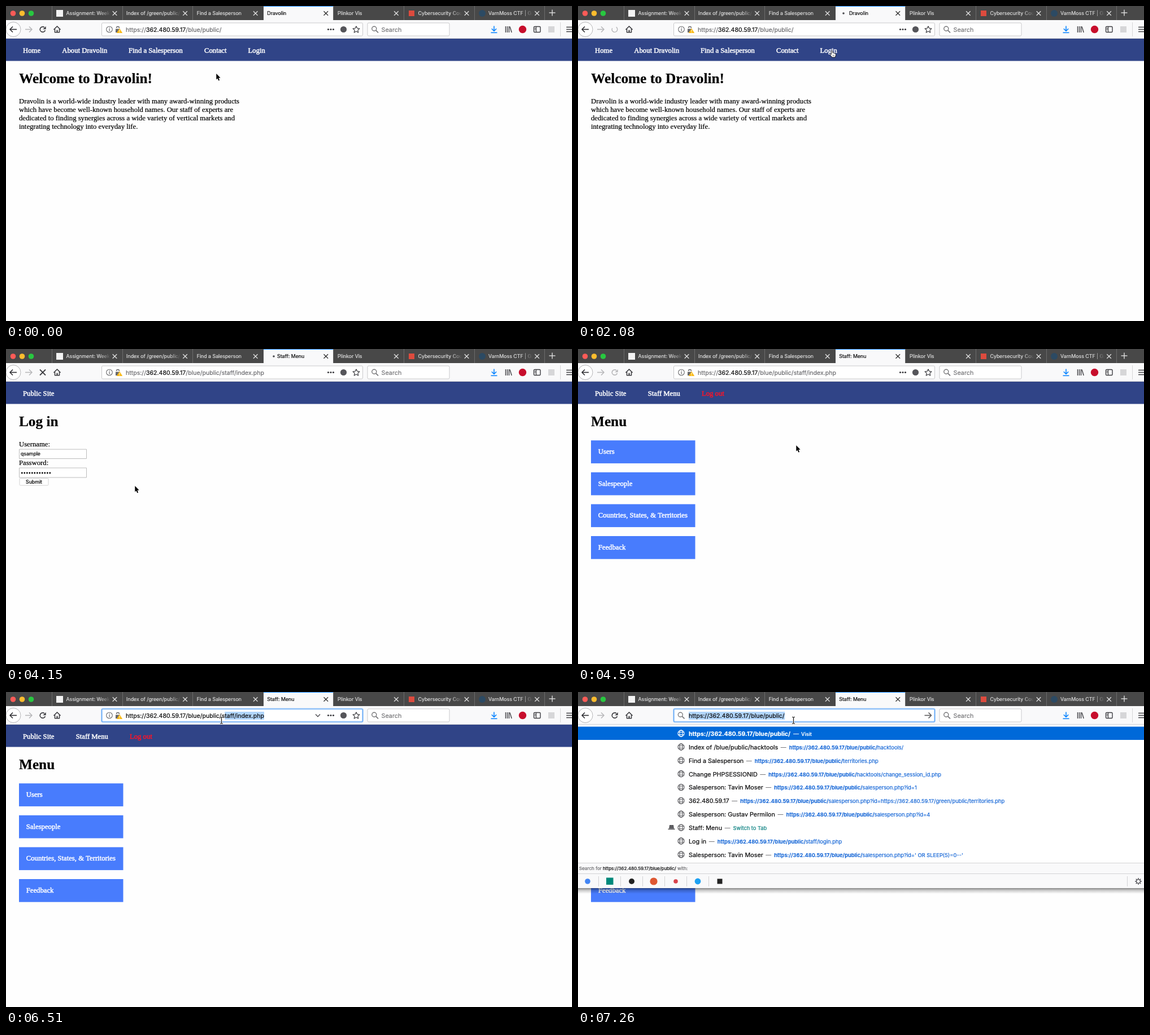
Write an HTML page with a canvas that moves like this. It is 1002x559 px and loops after 8 s.

```html
<!DOCTYPE html>
<html lang="en">
<head>
<meta charset="utf-8">
<title>Browser session</title>
<style>
html, body { margin: 0; width: 100%; height: 100%; overflow: hidden; background: #fefefe; }
canvas { display: block; }
</style>
</head>
<body>
<canvas id="stage" width="1002" height="559"></canvas>
<script>
const c = document.getElementById('stage').getContext('2d');
const LOOP = 8000, TICK = 148.15;
const HOST = '362.480.59.17', BASE = '/blue/public/';
const ROOT = 'https://' + HOST + BASE;
const INK = '#3e3e42', LINK = '#1365d6', SELECT = '#b1d5fb';

const ui = (size, weight = 400) => `${weight} ${size}px Inter, sans-serif`;
const serif = (size, weight = 400) => `${weight} ${size}px "Liberation Serif", serif`;

// Pointer keys: tick, x, y
const PATH = [
  [0, 372, 120], [6, 433, 86], [9, 433, 86], [11, 450, 79], [15, 450, 79],
  [17, 380, 102], [19, 130, 112], [20, 58, 104], [21, 52, 160], [23, 48, 228],
  [25, 49, 232], [26, 90, 236], [28, 228, 243], [29, 230, 243], [31, 386, 171],
  [33, 448, 82], [35, 469, 47], [36, 470, 46], [38, 470, 46], [42, 381.5, 49],
  [43, 381.5, 49], [44, 381.5, 50]
];

function pointerAt(n) {
  const i = PATH.findIndex(k => k[0] >= n);
  if (i < 0) return PATH[PATH.length - 1].slice(1);
  if (i === 0) return PATH[0].slice(1);
  const a = PATH[i - 1], b = PATH[i], p = (n - a[0]) / (b[0] - a[0]);
  return [a[1] + (b[1] - a[1]) * p, a[2] + (b[2] - a[2]) * p];
}

function rect(x, y, w, h, color) {
  c.fillStyle = color;
  c.fillRect(x, y, w, h);
}

function box(x, y, w, h, r, fill, stroke, width = 1) {
  c.beginPath();
  c.roundRect(x, y, w, h, r);
  if (fill) { c.fillStyle = fill; c.fill(); }
  if (stroke) { c.strokeStyle = stroke; c.lineWidth = width; c.stroke(); }
}

function disc(x, y, r, color) {
  c.beginPath();
  c.arc(x, y, r, 0, 7);
  c.fillStyle = color;
  c.fill();
}

function ring(x, y, r, color, width = 1.2, from = 0, to = Math.PI * 2) {
  c.beginPath();
  c.arc(x, y, r, from, to);
  c.strokeStyle = color;
  c.lineWidth = width;
  c.stroke();
}

function trace(points) {
  c.beginPath();
  for (let i = 0; i < points.length; i += 2) c.lineTo(points[i], points[i + 1]);
}

function line(points, color, width = 1.4) {
  trace(points);
  c.strokeStyle = color;
  c.lineWidth = width;
  c.stroke();
}

function poly(points, color) {
  trace(points);
  c.closePath();
  c.fillStyle = color;
  c.fill();
}

// Draws a string, slightly emboldened, and returns the x where it ends
function text(str, x, y, font, color, bolder = 0.22) {
  c.font = font;
  c.fillStyle = c.strokeStyle = color;
  c.lineWidth = bolder;
  c.lineJoin = 'round';
  c.fillText(str, x, y);
  c.strokeText(str, x, y);
  return x + c.measureText(str).width;
}

function cross(x, y, r, color, width = 1.4) {
  line([x - r, y - r, x + r, y + r], color, width);
  line([x - r, y + r, x + r, y - r], color, width);
}

function magnifier(x, y, color) {
  ring(x - 1.2, y - 1.3, 4, color, 1.4);
  line([x + 1.7, y + 1.6, x + 6, y + 5.8], color, 1.7);
}

function globe(x, y, color) {
  ring(x, y, 5.6, color, 1.1);
  c.beginPath();
  c.ellipse(x, y, 2.6, 5.6, 0, 0, 7);
  c.stroke();
  line([x - 5.5, y - 2, x + 5.5, y - 2], color, 0.9);
  line([x - 5.5, y + 2, x + 5.5, y + 2], color, 0.9);
}

function arrow(x, y, dir, color) {
  line([x - 6 * dir, y, x + 5.5 * dir, y], color, 1.6);
  line([x + dir, y - 5, x + 6 * dir, y, x + dir, y + 5], color, 1.6);
}

function tabs(title, loading, n) {
  rect(0, 0, 1002, 25, '#484848');
  ['#fc5b57', '#fdbc2e', '#28c840'].forEach((col, i) => disc(12.5 + i * 16, 13, 4.8, col));
  const names = ['Assignment: Week 10', 'Index of /green/public/', 'Find a Salesperson', title,
    'Plinkor Vis', 'Cybersecurity Course', 'VarnMoss CTF | Gam'];
  names.forEach((name, i) => {
    const x = 81.5 + i * 124.6, on = i === 3;
    if (on) {
      rect(456, 0, 123, 25, '#f9f9fa');
      rect(456, 0, 123, 1, '#0a84ff');
    } else {
      rect(Math.floor(x), 0, 1, 25, '#6c6c6c');
    }
    const iconic = i === 0 || i > 4;
    let left = x + (iconic ? 25 : 7);
    if (on && loading) {
      left = 480;
      disc(472 + 6 * Math.sin((n - 21) * 0.946), 13, 1.8, '#4a4a4f');
    }
    let color = '#0c0c0d';
    if (!on) {
      color = c.createLinearGradient(x + 82, 0, x + 103, 0);
      color.addColorStop(0, '#dcdcdc');
      color.addColorStop(1, 'rgba(220,220,220,0)');
    }
    text(name, left, 16, ui(8.8), color);
    cross(x + 111, 13, 3.8, on ? '#333' : '#dedede', 1.3);
  });
  rect(579, 0, 1, 25, '#6c6c6c');
  rect(953, 0, 1, 25, '#6c6c6c');
  rect(89, 7, 12, 12, '#f2f2f2');
  rect(713, 8, 10, 10, '#dd4b3e');
  disc(843, 13, 6, '#2c4a63');
  line([961.5, 12, 972.5, 12], '#dedede');
  line([967, 6.5, 967, 17.5], '#dedede');
}

function reload(state) {
  if (state === 'stop') return cross(65, 41.5, 5, INK, 1.8);
  if (state === 'arc') return ring(65, 41.5, 4.8, '#b5b5b8', 1.4, -1, 3.6);
  const color = state === 'dim' ? '#b8b8ba' : INK;
  ring(65, 41.5, 4.7, color, 1.7, 0.35, 5.4);
  poly([70.7, 36, 70.7, 41.3, 65.4, 41.3], color);
}

function star(x, y, r) {
  const pts = [];
  for (let i = 0; i <= 10; i++) {
    const a = i * Math.PI / 5 - Math.PI / 2, d = i % 2 ? r * 0.48 : r;
    pts.push(x + d * Math.cos(a), y + d * Math.sin(a));
  }
  line(pts, INK, 1.2);
}

function siteIdentity() {
  ring(183, 41.5, 5.3, '#6a6a6d', 1.1);
  rect(182.4, 40.5, 1.3, 4, '#6a6a6d');
  rect(182.4, 38.2, 1.3, 1.3, '#6a6a6d');
  ring(198, 39, 2.5, '#6a6a6d', 1.4, Math.PI, 6.3);
  rect(194, 40.5, 8, 6.5, '#6a6a6d');
  poly([201, 39.5, 206.2, 48, 195.8, 48], '#f9b915');
  rect(200.5, 42.2, 1, 3, '#fff');
  rect(200.5, 46, 1, 1, '#fff');
}

function addressBar(n, path, mouseX) {
  const focus = n >= 38, editing = n >= 47, hover = n >= 34;
  if (focus) {
    box(169.5, 30, 462, 23, 2.5, '#fff', 'rgba(90,165,250,.4)', 3);
    box(169.5, 30, 462, 23, 2, null, '#68aaf5', 1.2);
  } else {
    box(169.5, 30, 462, 23, 2, '#fff', hover ? '#a4a4a6' : '#c9c9cb');
  }
  const font = ui(10.6);
  c.font = font;
  const measure = s => c.measureText(s).width;
  if (editing) {
    magnifier(182.5, 41.5, '#7a7a7c');
    if (n >= 49) rect(196, 35, measure(ROOT) + 0.5, 14, SELECT);
    text(ROOT, 196, 46, font, '#0c0c0d');
    arrow(619.5, 41.5, 1, '#5a5a5d');
    return;
  }
  siteIdentity();
  if (focus) {
    const full = ROOT + path, end = 212 + measure(full);
    let from = full.length;
    while (from > ROOT.length && 212 + measure(full.slice(0, from)) > mouseX + 6) from--;
    const start = 212 + measure(full.slice(0, from));
    rect(start, 35, end - start, 14, SELECT);
    text(full, 212, 46, font, '#0c0c0d');
  } else {
    let x = text('https://', 212, 46, font, '#6c6c70');
    x = text(HOST, x, 46, font, '#0c0c0d');
    text(BASE + path, x, 46, font, '#6c6c70');
  }
  if (hover) line([548, 39.5, 552, 43.8, 556, 39.5], '#55555a', 1.5);
  [570.5, 575, 579.5].forEach(x => disc(x, 41.5, 1.6, INK));
  disc(597.5, 41.5, 5.6, '#55555a');
  star(620, 42, 6.3);
}

function toolbar(n, path, state, mouseX) {
  rect(0, 25, 1002, 33, '#f9f9fa');
  rect(0, 57, 1002, 1, '#d0d0d2');
  disc(13, 41.5, 13, '#fff');
  ring(13, 41.5, 13, '#b4b4b6', 1);
  arrow(13, 41.5, -1, '#2c2c30');
  arrow(40, 41.5, 1, '#b8b8ba');
  reload(state);
  line([84.5, 42, 90.5, 36, 96.5, 42], INK, 1.7);
  line([86.5, 41, 86.5, 46.8, 94.5, 46.8, 94.5, 41], INK, 1.6);
  rect(89.4, 42.6, 2.2, 4, INK);

  addressBar(n, path, mouseX);

  box(640, 30, 145, 23, 2, '#fff', '#c9c9cb');
  magnifier(653, 41.5, '#737376');
  text('Search', 664.5, 46, ui(10.8), '#77777a');

  line([864, 35.5, 864, 44], '#0a84ff', 1.6);
  line([859.8, 40.2, 864, 44.4, 868.2, 40.2], '#0a84ff', 1.6);
  line([858.5, 47.3, 869.5, 47.3], '#0a84ff', 1.6);
  [884.5, 887.5, 890.5].forEach(x => line([x, 36, x, 47], INK, 1.4));
  line([892, 36.5, 895.2, 47], INK, 1.4);
  disc(914.5, 41.5, 6.7, '#c70d2c');
  box(934.5, 36.5, 11.5, 10, 1.5, null, INK, 1.4);
  line([938.5, 36.5, 938.5, 46.5], INK, 1.2);
  line([935.5, 39.5, 938, 39.5], INK, 1);
  line([935.5, 42, 938, 42], INK, 1);
  rect(960, 36, 11, 11, '#d6d6d8');
  rect(981, 29, 1, 25, '#d5d5d7');
  [37.5, 41.5, 45.5].forEach(y => line([992, y, 1002, y], INK, 1.5));
}

const heavy = (str, x, y, color) => text(str, x, y, serif(12.7), color, 0.5);
const heading = str => text(str, 23, 137, serif(25.3, 700), '#000');
const copy = (str, y) => text(str, 23, y, serif(12.7), '#000');

function nav(items) {
  rect(0, 58, 1002, 39.5, '#304487');
  items.forEach(([label, x]) => heavy(label, x, 83, label === 'Log out' ? '#fb1428' : '#fff'));
}

const pages = {
  home() {
    nav([['Home', 30], ['About Dravolin', 99.3], ['Find a Salesperson', 217],
      ['Contact', 351], ['Login', 428.6]]);
    heading('Welcome to Dravolin!');
    ['Dravolin is a world-wide industry leader with many award-winning products',
      'which have become well-known household names. Our staff of experts are',
      'dedicated to finding synergies across a wide variety of vertical markets and',
      'integrating technology into everyday life.'
    ].forEach((str, i) => copy(str, 173 + i * 15));
  },
  login() {
    nav([['Public Site', 30]]);
    heading('Log in');
    copy('Username:', 173);
    box(23.5, 178, 119, 16.5, 0, '#fff', '#bcbcbc');
    text('qsample', 26, 189, ui(8.7), '#000');
    copy('Password:', 206);
    box(23.5, 211, 119, 17, 0, '#fff', '#bcbcbc');
    for (let i = 0; i < 12; i++) disc(28.3 + i * 4.5, 220, 1.4, '#000');
    box(24, 229.5, 51, 12.5, 1.5, '#fff', '#d2d2d2');
    text('Submit', 35, 239, ui(8.8), '#000');
  },
  menu() {
    nav([['Public Site', 30], ['Staff Menu', 123.7], ['Log out', 219]]);
    heading('Menu');
    ['Users', 'Salespeople', 'Countries, States, & Territories', 'Feedback'].forEach((label, i) => {
      const y = 162.2 + i * 56.6;
      rect(23, y, 184.5, 40.7, '#487cfd');
      heavy(label, 35.8, Math.round(y + 23.8), '#fff');
    });
  }
};

const RESULTS = [
  ['Index of ' + BASE + 'hacktools', 'hacktools/'],
  ['Find a Salesperson', 'territories.php'],
  ['Change PHPSESSIONID', 'hacktools/change_session_id.php'],
  ['Salesperson: Tavin Moser', 'salesperson.php?id=1'],
  [HOST, `salesperson.php?id=https://${HOST}/green/public/territories.php`],
  ['Salesperson: Gustav Permilon', 'salesperson.php?id=4'],
  ['Staff: Menu', null],
  ['Log in', 'staff/login.php'],
  ['Salesperson: Tavin Moser', "salesperson.php?id=' OR SLEEP(5)=0--'"]
];

function suggestions() {
  const shade = c.createLinearGradient(0, 348, 0, 358);
  shade.addColorStop(0, 'rgba(0,0,0,.48)');
  shade.addColorStop(0.4, 'rgba(0,0,0,.2)');
  shade.addColorStop(1, 'rgba(0,0,0,0)');
  rect(0, 348, 1002, 10, shade);
  rect(0, 58, 1002, 245, '#fff');
  rect(0, 61.5, 1002, 23.5, '#0069d9');
  globe(182.5, 73.5, '#fff');
  let x = text(ROOT, 196, 78, ui(10.6, 700), '#fff');
  line([x + 5, 74.5, x + 15, 74.5], '#fff', 1);
  text('Visit', x + 19, 78, ui(9, 500), '#fff');

  RESULTS.forEach(([title, tail], i) => {
    const y = 97.8 + i * 23.85, base = Math.round(y + 4);
    globe(182.5, y - 0.3, '#5c5c60');
    const end = text(title, 196, base, ui(10.8), '#0c0c0d');
    line([end + 4.5, base - 3.5, end + 14.5, base - 3.5], '#77777a', 1);
    if (tail === null) {
      text('Switch to Tab', end + 19.5, base, ui(9.3), '#0b8080');
      poly([162, 236, 169, 236, 170, 242.5, 161, 242.5], '#5c5c60');
      rect(159.5, 242.5, 12, 1.7, '#5c5c60');
    } else {
      const bold = text(ROOT, end + 19.5, base, ui(9.4, 600), LINK);
      text(tail, bold, base, ui(9.4), LINK);
    }
  });

  rect(0, 303, 1002, 45, '#f9f9fa');
  rect(0, 303, 1002, 1, '#d2d2d4');
  rect(0, 322, 1002, 1, '#d2d2d4');
  x = text('Search for ', 2, 316, ui(8.1), '#6a6a6d');
  x = text(ROOT, x, 316, ui(8.1), '#0c0c0d');
  text(' with:', x, 316, ui(8.1), '#6a6a6d');

  disc(17, 336, 4.8, '#4285f4');
  rect(50, 329.5, 12.5, 12.5, '#00897b');
  disc(95, 336, 5, '#222');
  disc(134, 336, 6.6, '#de5833');
  disc(173, 336, 3.8, '#d8434c');
  disc(212, 336, 5.4, '#1da1f2');
  rect(246.5, 331.5, 9, 9, '#222');
  for (let i = 0; i < 6; i++) rect(Math.round(36 + i * 38.9), 327, 1, 18, '#d2d2d4');
  rect(972, 327, 1, 18, '#d2d2d4');
  ring(992, 336, 3.4, '#55555a', 1.4);
  for (let i = 0; i < 8; i++) {
    const a = i * Math.PI / 4, dx = Math.cos(a), dy = Math.sin(a);
    line([992 + dx * 3.6, 336 + dy * 3.6, 992 + dx * 6, 336 + dy * 6], '#55555a', 1.5);
  }
}

function pointer(x, y, kind) {
  c.save();
  c.translate(x, y);
  c.lineJoin = 'round';
  if (kind === 'beam') {
    const shape = [-2.5, -5.5, -0.8, -5.5, 0, -4.5, 0, 5, -0.8, 6, -2.5, 6];
    const flip = shape.map((v, i) => i % 2 ? v : -v);
    [['rgba(255,255,255,.8)', 2.4], ['#111', 1.1]].forEach(([color, w]) => {
      line(shape, color, w);
      line(flip, color, w);
    });
  } else if (kind === 'hand') {
    c.beginPath();
    c.moveTo(-1.6, 7);
    c.lineTo(-1.6, 1);
    c.quadraticCurveTo(-0.4, -0.8, 0.7, 1);
    c.lineTo(0.9, 4.2);
    c.quadraticCurveTo(2.2, 3.2, 3, 4.8);
    c.quadraticCurveTo(4.2, 4, 4.8, 5.4);
    c.quadraticCurveTo(6.4, 5, 6.4, 6.8);
    c.quadraticCurveTo(6.4, 9.6, 5.2, 12);
    c.lineTo(-0.6, 12);
    c.quadraticCurveTo(-1.6, 9.6, -3.8, 7.6);
    c.quadraticCurveTo(-3.4, 5.6, -1.6, 7);
    c.closePath();
    c.fillStyle = '#fff';
    c.fill();
    c.strokeStyle = '#111';
    c.lineWidth = 0.9;
    c.stroke();
    [1.4, 3.2].forEach(fx => line([fx, 7.6, fx, 10], '#111', 0.6));
  } else {
    trace([0.3, 0, 0.3, 10.6, 2.6, 8.4, 4.3, 12.6, 6.1, 11.8, 4.4, 7.8, 7.6, 7.6]);
    c.closePath();
    c.strokeStyle = '#fff';
    c.lineWidth = 1.6;
    c.stroke();
    c.fillStyle = '#000';
    c.fill();
  }
  c.restore();
}

function draw(t) {
  const n = Math.floor((t + 12) / TICK);
  const within = (a, b) => n >= a && n < b;
  const page = n < 18 ? 'home' : n < 29 ? 'login' : 'menu';
  const title = n < 17 ? 'Dravolin' : n < 27 ? 'Log in' : 'Staff: Menu';
  const path = n < 17 ? '' : n < 27 ? 'staff/login.php' : 'staff/index.php';
  const loading = within(14, 19) || within(25, 30);
  let state = 'ready';
  if (n === 14 || n === 25) state = 'arc';
  else if (loading) state = 'stop';
  else if (within(19, 23) || within(30, 34)) state = 'dim';
  const [x, y] = pointerAt(n);

  rect(0, 0, 1002, 559, '#fefefe');
  pages[page]();
  tabs(title, loading, n);
  toolbar(n, path, state, x);
  if (n >= 48) suggestions();
  pointer(x, y, within(11, 17) ? 'hand' : n >= 35 ? 'beam' : 'arrow');
}

const begin = performance.now();
function frame() {
  draw((performance.now() - begin) % LOOP);
  requestAnimationFrame(frame);
}
frame();
</script>
</body>
</html>
```
